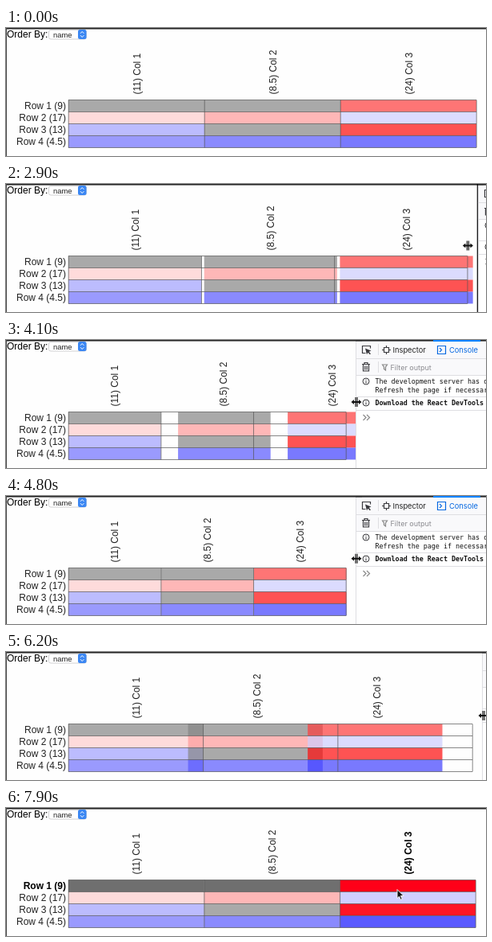
An HTML page for the animation above (8000 ms loop, 600 px wide and 161 px high).

```html
<!DOCTYPE html>
<html lang="en">
<head>
<meta charset="utf-8">
<title>Resizable matrix</title>
<style>
html, body { margin: 0; width: 100%; height: 100%; overflow: hidden; background: #fefefe; }
svg { display: block; }
text { font: 12px "Liberation Sans", Arial, sans-serif; fill: #222; white-space: pre; }
.bold { font-weight: bold; fill: #000; }
.ui { font: 9.3px Inter, sans-serif; }
.mono { font: 8.35px "DejaVu Sans Mono", monospace; fill: #111; }
.mono.bold { font-weight: bold; }
.icon { fill: none; stroke: #3a3a3e; stroke-width: 1.2; }
.rule { stroke: #dedee2; }
</style>
</head>
<body>
<svg width="600" height="161" viewBox="0 0 600 161">
  <text x="1" y="11.5" style="fill:#000">Order By:</text>
  <rect x="53.5" y="2.5" width="47" height="11.5" rx="2.5" fill="#fff" stroke="#d2d2d4"/>
  <text x="59" y="11.8" style="font-size:9.4px">name</text>
  <rect x="90" y="2" width="10.5" height="12" rx="2.5" fill="#3b87f3"/>
  <path d="M93 6.8l2.2-2.3 2.2 2.3M93 9.2l2.2 2.3 2.2-2.3" fill="none" stroke="#fff"/>

  <g id="cells"></g>
  <path id="grid" fill="none" stroke="#555" stroke-opacity=".7"/>
  <g id="labels"></g>

  <rect width="600" height="1.5" fill="#222"/>
  <rect width="1" height="161" fill="#444"/>
  <rect id="gap" width="8" height="161" fill="#000"/>

  <g id="panel">
    <rect y="1.5" width="300" height="160" fill="#fff"/>
    <rect y="1.5" width="300" height="42.5" fill="#f9f9fb"/>
    <rect width="300" height="1.5" fill="#222"/>
    <rect x="97" width="59" height="2" fill="#0a84ff"/>
    <path class="rule" d="M.5 2V161M0 23.5H300M0 44.5H300M28.5 5V19M28.5 27V41M0 71.5H300M0 88.5H300"/>
    <path class="icon" d="M12.5 16.500H8.500V7.500H18.500V10.500"/>
    <path d="M12 10.500l7.500 3-2.800 1.200 2.300 2.500-1.200 1-2.300-2.500-1.500 2.500z" fill="#3a3a3e"/>
    <path class="icon" d="M35.500 9.500H41.500V15.500H35.500ZM38.500 7V9.500M38.500 15.500V18M33 12.500H35.500M41.500 12.500H44"/>
    <text class="ui" x="46.500" y="15.800">Inspector</text>
    <path class="icon" style="stroke:#0668e1" d="M102.500 7.500H112.500V17.500H102.500ZM105 10l2.500 2.500-2.500 2.500"/>
    <text class="ui" x="117" y="15.800" style="fill:#0668e1">Console</text>
    <path class="icon" d="M8 30.500H18M11 30V28.500H15V30M9.500 31V39H16.500V31M11.800 32.500V37.500M14.200 32.500V37.500"/>
    <path class="icon" style="stroke:#888" d="M33.500 31H39.500L37.500 34V38L35.500 36.500V34Z"/>
    <text class="ui" x="43.500" y="37.500" style="font-size:9px;fill:#8b8b90">Filter output</text>
    <path class="icon" style="stroke-width:1" d="M9 52a4 4 0 1 0 8 0a4 4 0 1 0-8 0M13 51.500V54.500M13 49.500V50.500M9 79a4 4 0 1 0 8 0a4 4 0 1 0-8 0M13 78.500V81.500M13 76.500V77.500"/>
    <text class="mono" x="24.500" y="55">The development server has disconnected.</text>
    <text class="mono" x="24.500" y="66">Refresh the page if necessary.</text>
    <text class="mono bold" x="24.500" y="82">Download the React DevTools for a better</text>
    <path class="icon" style="stroke:#888" d="M9.500 94l3.500 3.500-3.500 3.500M14 94l3.500 3.500-3.500 3.500"/>
  </g>

  <path id="resize" fill="#111" stroke="#fff" stroke-width=".8" paint-order="stroke"
    d="M-6.500 0L-3-3V-1H-1.600V-6H-.4V-1H.4V-6H1.600V-1H3V-3L6.500 0L3 3V1H1.600V6H.4V1H-.4V6H-1.600V1H-3V3Z"/>
  <path id="arrow" fill="#111" stroke="#fff" stroke-width=".9" d="M0 0V11L2.500 8.800L4.300 12.800L6.200 12L4.400 8H8Z"/>
</svg>
<script>
const $ = id => document.getElementById(id);
const LEFT = 78, TOP = 90.5, ROW = 15, LOOP = 8000, STEP = 100;
const rows = ["Row 1 (9)", "Row 2 (17)", "Row 3 (13)", "Row 4 (4.5)"];
const cols = ["(11) Col 1", "(8.5) Col 2", "(24) Col 3"];
const red = v => `rgb(255,${v},${v})`, blue = v => `rgb(${v},${v},255)`, gray = "#878787";
const colors = [
  [gray, gray, red(61)],
  [red(205), red(154), blue(205)],
  [blue(161), gray, red(12)],
  [blue(113), blue(91), blue(66)]
];
const hotCol = ["#ff0018", "#d0d0ff", "#ff1525", "#5a5aff"], hotGray = "#6f6f6f";

function add(parent, tag, attrs, text = "") {
  const el = document.createElementNS("http://www.w3.org/2000/svg", tag);
  set(el, attrs);
  el.textContent = text;
  return $(parent).appendChild(el);
}
function set(el, attrs) {
  for (const k in attrs) el.setAttribute(k, attrs[k]);
}
const move = (id, x, y = 0) => set($(id), { transform: `translate(${x} ${y})` });

const cells = colors.map((line, r) => line.map(() =>
  add("cells", "rect", { y: TOP + r * ROW, height: ROW })));
const rowLabels = rows.map((s, r) =>
  add("labels", "text", { x: 75, y: 101.5 + r * ROW, "text-anchor": "end" }, s));
const colLabels = cols.map(s => add("labels", "text", {}, s));

// Linear interpolation through [time, value] points
function track(points, t) {
  const i = points.findIndex(p => p[0] > t);
  if (i < 0) return points[points.length - 1][1];
  if (!i) return points[0][1];
  const [t0, a] = points[i - 1], [t1, b] = points[i];
  return a + (b - a) * (t - t0) / (t1 - t0);
}
function ease(t, start) {
  const u = Math.min(1, Math.max(0, (t - start) / 1000));
  return u < .5 ? 4 * u ** 3 : 1 - 4 * (1 - u) ** 3;
}

const edgePath = [[2750, 600], [2950, 585], [3400, 480.5], [3570, 437], [5050, 437],
  [5300, 503], [5650, 595], [6250, 595], [6500, 599]];
const mousePath = [[1400, 620], [1500, 602], [2100, 600], [2700, 599], [2950, 572], [3400, 468],
  [3530, 438], [4950, 438], [5300, 532], [5550, 597], [6250, 597], [6500, 612]];
const slowStart = [[2800, 170], [3300, 168.5], [3400, 166.7]];
const slowReturn = [[5000, 116], [5300, 116.7], [5660, 118]];

// Column offsets ease towards the new width for one second after each drag
function spacing(t) {
  if (t < 3570) return track(slowStart, t);
  if (t < 5000) return 166.7 - 50.7 * ease(t, 3570);
  return track(slowReturn, t) + 51.7 * ease(t, 5660);
}

function draw(t) {
  const edge = track(edgePath, t), w = (edge - 90) / 3;
  const cellGap = spacing(t), labelGap = spacing(t + 10);
  const ax = track([[7300, 598], [7700, 489]], t), ay = track([[7300, 82], [7700, 102.5]], t);
  const hover = t > 7300 && ay > TOP;

  cells.forEach((line, r) => line.forEach((cell, c) => {
    const hot = hover && (r === 0 || c === 2);
    set(cell, {
      x: LEFT + c * cellGap, width: w,
      fill: hot ? (c === 2 ? hotCol[r] : hotGray) : colors[r][c],
      "fill-opacity": hot ? 1 : .7
    });
  }));
  let d = "";
  for (let i = 0; i < 5; i++) d += `M${LEFT} ${TOP + i * ROW}H${LEFT + 3 * w}`;
  for (let i = 0; i < 4; i++) d += `M${LEFT + .2 + i * w} ${TOP}V150.5`;
  set($("grid"), { d });

  colLabels.forEach((el, c) => set(el, {
    transform: `translate(${LEFT + c * labelGap + w / 2 + 4.5} 83.5) rotate(-90)`,
    class: hover && c === 2 ? "bold" : ""
  }));
  set(rowLabels[0], { class: hover ? "bold" : "" });

  // The panel trails the page edge while opening, leaving a black gap
  const open = edge < 598;
  move("gap", open ? edge : 610);
  move("panel", open ? Math.max(edge, track(edgePath, t - 16)) : 610);
  move("resize", track(mousePath, t), track([[3400, 77.5], [4100, 78], [6200, 80]], t));
  move("arrow", t < 7300 ? 620 : ax, ay);
}

function tick(now) {
  draw(Math.floor(now % LOOP / STEP) * STEP);
  requestAnimationFrame(tick);
}
draw(0);
requestAnimationFrame(tick);
</script>
</body>
</html>
```
